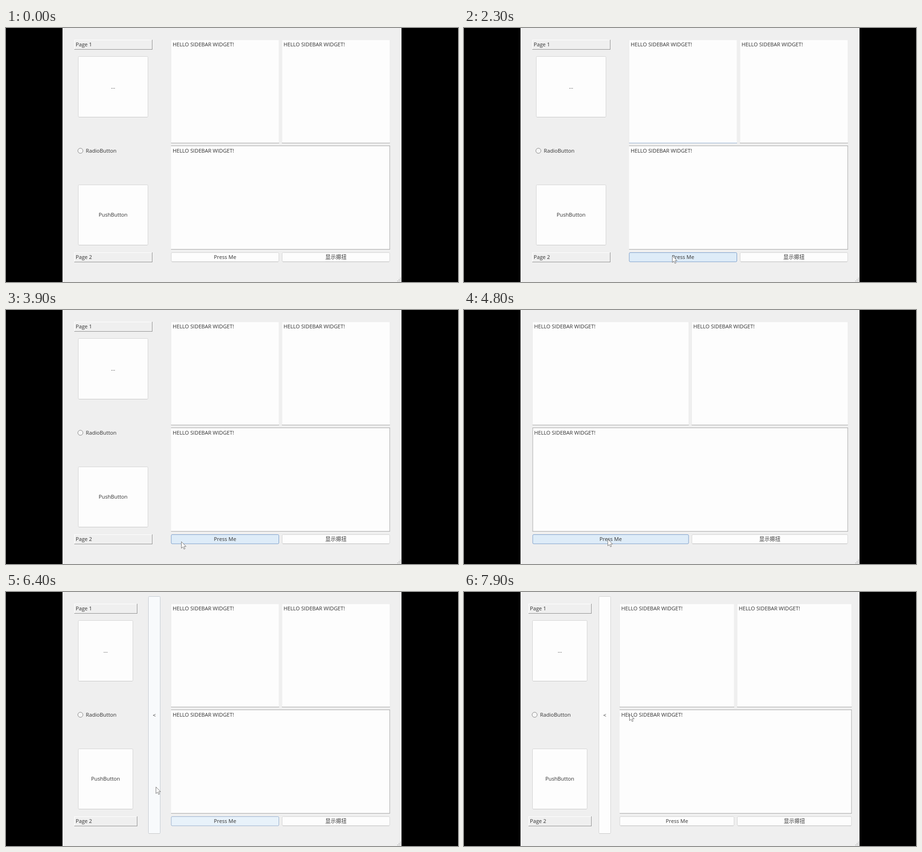
Animation, 960 px wide and 540 px high, one loop 8000 ms. Source, as an HTML page with a canvas:

```html
<!DOCTYPE html>
<html lang="en">
<head>
<meta charset="utf-8">
<title>Sidebar widget</title>
<style>
  html, body { margin: 0; width: 100%; height: 100%; overflow: hidden; background: #000; }
  canvas { display: block; width: 960px; height: 540px; }
</style>
</head>
<body>
<canvas id="stage" width="960" height="540"></canvas>
<script>
const ctx = document.getElementById('stage').getContext('2d');
const LOOP = 8000, STEP = 100, SLIDE = 400, GLIDE = 800, HANDLE_SHOWN = 5900;
const FONT = '11.2px "Open Sans", "Noto Sans CJK SC", "Noto Sans CJK", sans-serif';
const LINE = '#a4a4a4', WHITE = '#fdfdfd';
const ARROW = new Path2D('M0 0V14L3.3 11L5.6 16L7.8 15L5.6 10.2H10Z');

// Each toggle closes the open sidebar or opens the closed one
const toggles = [2750, 3400, 4300, 4900, 6500, 7537];

// Where the pointer arrives, and when
const stops = [
  { at: 0, x: 490, y: -17 },
  { at: 1750, x: 442, y: 484 },
  { at: 3800, x: 372, y: 492 },
  { at: 4700, x: 305, y: 487 },
  { at: 5800, x: 640, y: 486 },
  { at: 6310, x: 430, y: 480 },
  { at: 6400, x: 318, y: 414 },
  { at: 7400, x: 142.5, y: 281 },
  { at: 7900, x: 351, y: 259 }
];

const clamp = v => Math.max(0, Math.min(1, v));
const ease = k => k * k * (3 - 2 * k);
const mix = (a, b, k) => a + (b - a) * k;
const blend = (a, b, k) => `rgb(${a.map((v, i) => Math.round(mix(v, b[i], k)))})`;

function pointer(t) {
  const i = stops.findIndex(s => s.at > t);
  if (i < 0) return stops[stops.length - 1];
  const from = stops[i - 1], to = stops[i];
  const length = Math.min(GLIDE, to.at - from.at);
  const k = ease(clamp(1 - (to.at - t) / length));
  return { x: mix(from.x, to.x, k), y: mix(from.y, to.y, k) };
}

function layout(t) {
  const count = toggles.filter(start => t >= start).length;
  const goal = 1 - count % 2;
  const open = count ? mix(1 - goal, goal, clamp((t - toggles[count - 1]) / SLIDE)) : 1;
  const handle = t >= HANDLE_SHOWN;
  // Margins tighten while the sidebar is moving
  const margin = 16 - 8 * clamp(Math.min(open, 1 - open) * 12);
  const edge = 129 + (handle ? 173 : 205) * open;
  const left = edge + (handle ? 32 : 0) + (16 + margin) / 2 + .5;
  const right = 831.5 - margin;
  const half = (right - left - 6) / 2;
  const second = left + half + 6;
  const sideRight = edge - 7 - margin;
  return {
    open, goal, handle, left, right, half, second, sideRight,
    sideLeft: Math.min(129 + margin, sideRight - 98),
    buttons: {
      press: [left, 477, half, 20.5],
      show: [second, 477, half, 20.5],
      handle: [edge, 9, 26, 505]
    }
  };
}

// Share of the last moments that the pointer spent over a button
function hover(name, t) {
  const samples = 6;
  let hits = 0;
  for (let i = 0; i < samples; i++) {
    const at = Math.max(0, t - i * 40), state = layout(at), c = pointer(at);
    if (name === 'handle' && !state.handle) continue;
    const [x, y, w, h] = state.buttons[name];
    if (c.x >= x && c.x <= x + w && c.y >= y && c.y <= y + h) hits++;
  }
  return hits / samples;
}

function fill(x, y, w, h, color) {
  ctx.fillStyle = color;
  ctx.fillRect(x, y, w, h);
}

function label(text, x, y, align = 'left') {
  ctx.font = FONT;
  ctx.textAlign = align;
  ctx.fillStyle = '#303030';
  ctx.fillText(text, x, y);
}

function button([x, y, w, h], text, baseline, glow = 0) {
  ctx.beginPath();
  ctx.roundRect(x + .5, y + .5, w - 1, h - 1, 2);
  ctx.fillStyle = blend([253, 253, 253], [222, 236, 248], glow);
  ctx.fill();
  ctx.lineWidth = 1;
  ctx.strokeStyle = blend([211, 211, 211], [118, 154, 200], glow);
  ctx.stroke();
  if (glow < .2) fill(x + 2, y + h - 1, w - 4, 1, '#c6c6c6');
  label(text, x + w / 2, baseline, 'center');
}

function pageTab(x, y, w, text) {
  fill(x, y, w, 1, '#fff');
  fill(x, y, 1, 21, '#fff');
  fill(x, y + 20, w, 1, '#8e8e8e');
  fill(x + w - 1, y, 1, 21, '#8e8e8e');
  label(text, x + 3, y + 14);
}

function sidebar({ sideLeft, sideRight }) {
  const x = Math.round(sideLeft), w = Math.round(sideRight) - x;
  pageTab(x, 25, w, 'Page 1');
  pageTab(x, 477, w, 'Page 2');
  button([x + 8, 60, w - 17, 130], '...', 129);
  button([x + 8, 333, w - 17, 129], 'PushButton', 401);
  ctx.beginPath();
  ctx.arc(x + 13, 261, 5.4, 0, Math.PI * 2);
  ctx.fillStyle = '#f6f6f6';
  ctx.fill();
  ctx.strokeStyle = '#868686';
  ctx.stroke();
  label('RadioButton', x + 24.5, 265);
}

function editors({ left, right, half, second, handle, open }, t) {
  const greeting = 'HELLO SIDEBAR WIDGET!';
  const glow = t >= 2000 && t < toggles[0];
  for (const x of [left, second]) {
    fill(x, 25, half, 220, '#e8e8e8');
    fill(x + .5, 25.5, half - 1, 219, WHITE);
    fill(x, 244, half, 1, glow && x === left ? '#8facd0' : LINE);
    label(greeting, x + 3.5, 39.3);
  }
  const w = right - left;
  fill(left, 250, w, 221, WHITE);
  fill(left, 250, w, 1, LINE);
  fill(left, 470, w, 1, LINE);
  fill(right - 1, 250, 1, 221, LINE);
  if (!handle && !open) fill(left, 250, 1, 221, LINE);
  label(greeting, left + 3.5, 265.3);
}

function sizeGrip() {
  for (let row = 0; row < 3; row++)
    for (let col = 0; col <= row; col++)
      fill(837 - col * 3, 531 + row * 3, 1.6, 1.6, '#b3b3b3');
}

function arrow({ x, y }) {
  ctx.save();
  ctx.translate(x + .5, y + .5);
  ctx.fillStyle = '#fff';
  ctx.fill(ARROW);
  ctx.lineWidth = 1;
  ctx.strokeStyle = '#757575';
  ctx.stroke(ARROW);
  ctx.restore();
}

function draw(t) {
  const s = layout(t);
  fill(0, 0, 960, 540, '#000');
  ctx.save();
  ctx.beginPath();
  ctx.rect(120, 0, 720, 540);
  ctx.clip();
  fill(120, 0, 720, 540, '#efefef');
  if (s.open > 0) sidebar(s);
  editors(s, t);
  button(s.buttons.press, 'Press Me', 491, hover('press', t));
  button(s.buttons.show, '显示摁扭', 491, hover('show', t));
  if (s.handle) button(s.buttons.handle, s.goal ? '<' : '>', 265.5, hover('handle', t));
  sizeGrip();
  arrow(pointer(t));
  ctx.restore();
}

function tick() {
  const t = performance.now() % LOOP;
  draw(Math.floor(t / STEP) * STEP);
  requestAnimationFrame(tick);
}
tick();
</script>
</body>
</html>
```
